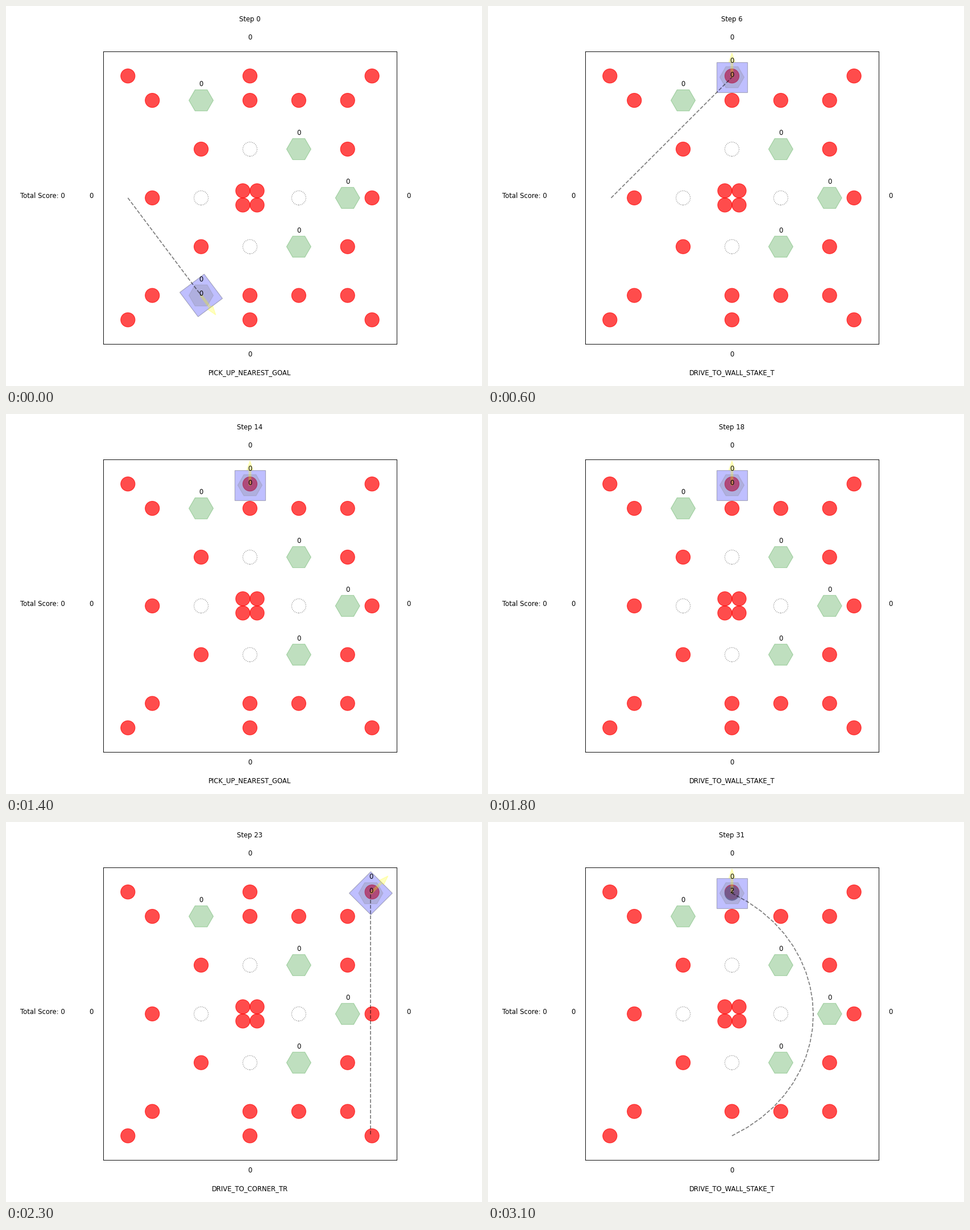
Write a matplotlib script that moves like this. It is 837 px wide and 669 px high and loops after 3.2 s.

```python
import math

import matplotlib.pyplot as plt
import numpy as np
from matplotlib.animation import FuncAnimation
from matplotlib.patches import Circle, FancyArrow, Polygon, RegularPolygon

W, H, DPI = 837, 669, 83.7
SIZE = 144                      # field side, inches
MID = SIZE / 2
ROBOT = 15
EDGE = ROBOT / math.sqrt(2) + 2  # closest the robot gets to a wall
FAR = SIZE - EDGE

# key: (x, y, heading in degrees, action name)
SPOTS = {
    "T": (MID, FAR, 90, "DRIVE_TO_WALL_STAKE_T"),
    "B": (MID, EDGE, -90, "DRIVE_TO_WALL_STAKE_B"),
    "L": (EDGE, MID, 180, "DRIVE_TO_WALL_STAKE_L"),
    "R": (FAR, MID, 0, "DRIVE_TO_WALL_STAKE_R"),
    "TL": (EDGE, FAR, 135, "DRIVE_TO_CORNER_TL"),
    "TR": (FAR, FAR, 45, "DRIVE_TO_CORNER_TR"),
    "BL": (EDGE, EDGE, -135, "DRIVE_TO_CORNER_BL"),
    "BR": (FAR, EDGE, -45, "DRIVE_TO_CORNER_BR"),
}
PLAN = ("goal L goal TL goal L T goal T R T goal T T goal T goal T T "
        "TL L BL BR TR BR ring TR T goal B ring T").split()

RINGS = sorted(
    [(12, 12), (12, 132), (132, 12), (132, 72), (132, 132), (72, 12), (72, 132),
     (24, 24), (24, 72), (24, 120), (48, 48), (48, 96), (72, 24), (72, 120),
     (96, 24), (96, 120), (120, 24), (120, 48), (120, 96), (120, 120)]
    + [(MID + a, MID + b) for a in (-3.5, 3.5) for b in (-3.5, 3.5)])
GOALS = [(48, 24), (48, 120), (96, 48), (96, 96), (120, 72)]
STAKES = [(48, 72), (72, 48), (72, 96), (96, 72)]


def route(a, b):
    """Straight line, or a bow to the right around the centre."""
    if abs(a[0] - MID) > 1 or abs(b[0] - MID) > 1 or abs(a[1] - b[1]) < 60:
        return np.array([a, b])
    t = np.linspace(0, 1, 21)[:, None]
    a, b = np.array(a), np.array(b)
    side = np.array([53.3, 0])
    c = a + 0.215 * (b - a) + side
    d = b - 0.215 * (b - a) + side
    return ((1 - t) ** 3 * a + 3 * (1 - t) ** 2 * t * c
            + 3 * (1 - t) * t ** 2 * d + t ** 3 * b)


def nearest(points, pos):
    return min(range(len(points)), key=lambda i: math.dist(points[i], pos))


def simulate():
    pos, angle, held, has_goal = (12, MID), 0, [], False
    states = []
    for key in PLAN:
        old = pos
        if key in SPOTS:
            x, y, angle, name = SPOTS[key]
            pos = (x, y)
        elif key == "ring":
            name = "PICK_UP_NEAREST_RING"
            i = nearest(RINGS, pos)
            pos = RINGS[i]
            held = held + [i]
        else:
            name = "PICK_UP_NEAREST_GOAL"
            if not has_goal:
                pos, has_goal = GOALS[0], True
        if key not in SPOTS and pos != old:
            angle = math.degrees(math.atan2(pos[1] - old[1], pos[0] - old[0]))
        path = route(old, pos) if pos != old else None
        states.append((name, pos, angle, held, path))
    return states


STATES = simulate()
fig, ax = plt.subplots(figsize=((W + 0.01) / DPI, (H + 0.01) / DPI), dpi=DPI,
                       facecolor="white")


def label(x, y, text):
    ax.text(x, y, text, ha="center", fontsize=10, family="DejaVu Sans",
            color="black")


def hexagon(pos, color):
    ax.add_patch(RegularPolygon(pos, 6, radius=6, orientation=math.pi / 6,
                                color=color, alpha=0.25))
    label(pos[0], pos[1] + 7, "0")


def draw(step):
    name, pos, angle, held, path = STATES[step]
    ax.clear()
    ax.set(xlim=(0, SIZE), ylim=(0, SIZE), xticks=[], yticks=[], aspect="equal")

    for spot in STAKES:
        ax.add_patch(Circle(spot, 3.5, fill=False, ec="black", ls="dotted",
                            alpha=0.5))
    for i, spot in enumerate(RINGS):
        taken = i in held
        ax.add_patch(Circle(pos if taken else spot, 3.5, alpha=0.7,
                            color="gray" if taken else "red"))

    turn = np.radians(angle + 45 + 90 * np.arange(4))
    corners = np.array(pos) + ROBOT / math.sqrt(2) * np.c_[np.cos(turn), np.sin(turn)]
    ax.add_patch(Polygon(corners, fc="blue", ec="black", alpha=0.25))
    hexagon(pos, "gray")
    for goal in GOALS[1:]:
        hexagon(goal, "green")
    a = math.radians(angle)
    ax.add_patch(FancyArrow(*pos, ROBOT / 2 * math.cos(a), ROBOT / 2 * math.sin(a),
                            width=1, color="yellow", alpha=0.25))
    if path is not None:
        ax.plot(path[:, 0], path[:, 1], "--", color="black", alpha=0.5, lw=1.5)

    label(*pos, str(len(held)))
    for x, y in ((-6, MID), (SIZE + 6, MID), (MID, -6), (MID, SIZE + 6)):
        label(x, y, "0")
    label(-30, MID, "Total Score: 0")
    label(MID, SIZE + 15, f"Step {step}")
    label(MID, -15, name)
    return []


anim = FuncAnimation(fig, draw, frames=len(PLAN), interval=100, repeat=True,
                     repeat_delay=0)
plt.show()
```
